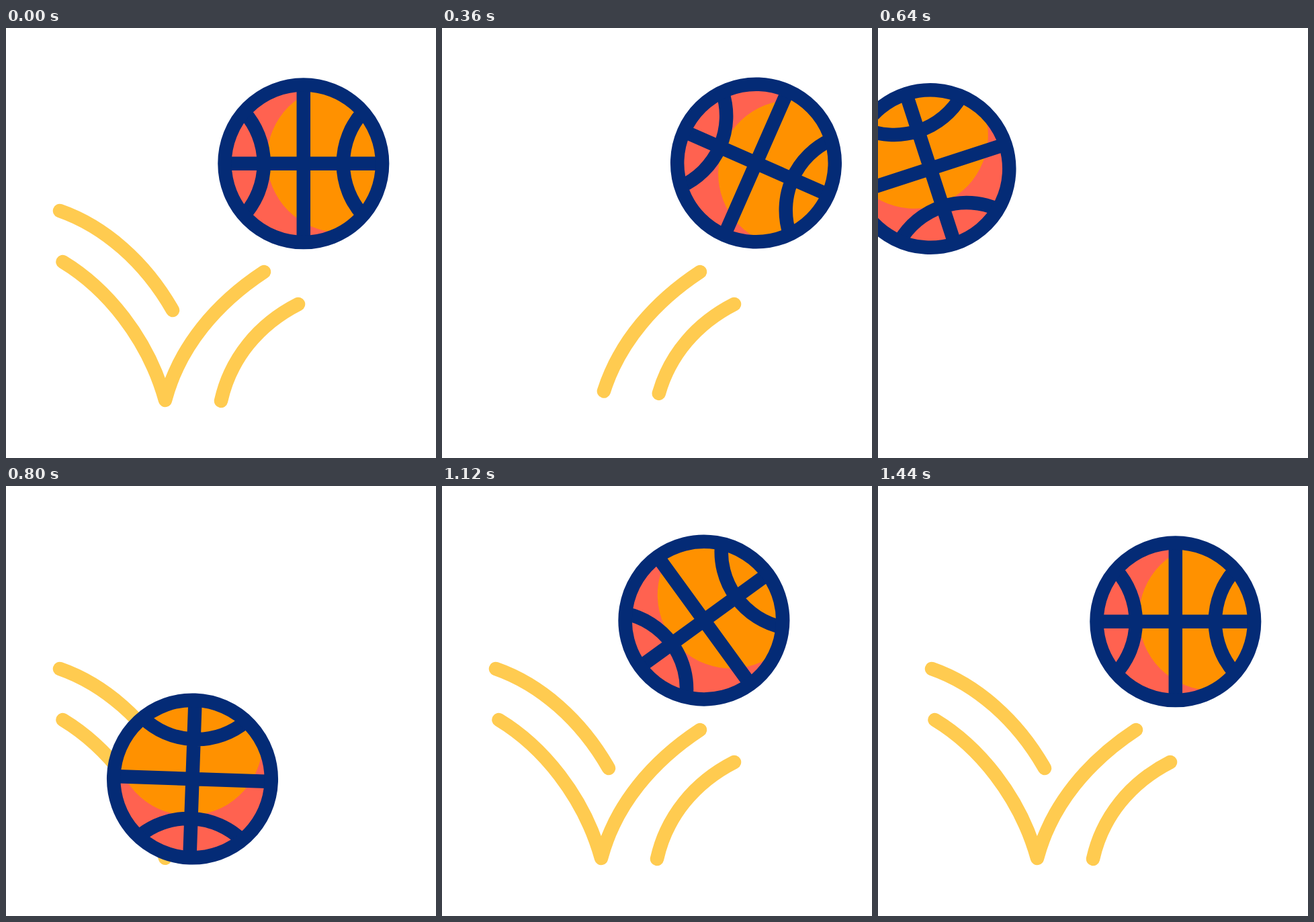
These frames come from a looping animation (640 px wide and 640 px high, 1480 ms). An HTML page:

```html
<!DOCTYPE html>
<html lang="en">
<head>
<meta charset="utf-8">
<title>Bouncing ball</title>
<style>
  html, body { margin: 0; width: 100%; height: 100%; overflow: hidden; background: #fff; }
  svg { display: block; width: 100%; height: 100%; }
  .trail path { fill: none; stroke: #ffcb50; stroke-width: 20.5; stroke-linecap: round; stroke-linejoin: round; }
  .seams { fill: none; stroke: #042b76; stroke-width: 20.5; }
</style>
</head>
<body>
<svg viewBox="0 0 640 640">
  <clipPath id="skin"><circle r="117"/></clipPath>
  <g class="trail">
    <path id="upper" pathLength="1" d="M80 272C146 295 207 348 248 420"/>
    <path id="vee" pathLength="1" d="M84.5 348C149 387 211 461 237 554C258 474 314 409 384 363"/>
    <path id="lower" pathLength="1" d="M320 555C334 492 376 441 435 411"/>
  </g>
  <g id="ball">
    <g clip-path="url(#skin)">
      <circle r="117" fill="#ff6250"/>
      <circle cx="55" cy="-7" r="109.5" fill="#ff9100"/>
    </g>
    <g class="seams">
      <path d="M0-117V117M-117 0H117M-88.6-77A115 115 0 0 1-88.6 77M88.6-77A115 115 0 0 0 88.6 77"/>
      <circle r="117.3"/>
    </g>
  </g>
</svg>
<script>
const LOOP = 1480, STEP = 40;
const REST = { x: 442.8, y: 201.8 };
const FLOOR = { x: 277.5, y: 436 };
const APEX = { x: 418, y: 194 };

const $ = id => document.getElementById(id);
const ball = $('ball');
const ramp = (t, from, to) => Math.min(1, Math.max(0, (t - from) / (to - from)));
const smooth = u => u * u * (3 - 2 * u);
const mix = (a, b, u) => a + (b - a) * u;

// Dip slightly, then shoot off to the upper right
function leave(t) {
  const dip = smooth(ramp(t, 80, 240));
  const shot = ramp(t, 240, 560) ** 2.66;
  return [REST.x + 335 * shot, REST.y + 9 * dip - 133 * shot, 60 * ramp(t, 80, 560) ** 1.72];
}

// Fall in from the left, ever steeper
function enter(t) {
  const left = (800 - t) / 160;
  return [FLOOR.x - 199.5 * left ** 1.4, FLOOR.y - 226.5 * left ** 0.8, -88 - 20 * left];
}

// Rise to the apex, then settle
function rebound(t) {
  const rise = ramp(t, 800, 1200), settle = ramp(t, 1200, 1440);
  return [
    mix(FLOOR.x, APEX.x, rise) + (REST.x - APEX.x) * (1 - (1 - settle) ** 2),
    mix(APEX.y, FLOOR.y, (1 - rise) ** 2.29) + (REST.y - APEX.y) * smooth(settle),
    -88 * (1 - ramp(t, 800, 1440)) ** 1.29
  ];
}

function trim(id, start, end) {
  const style = $(id).style;
  style.visibility = end > start ? 'visible' : 'hidden';
  style.strokeDasharray = end - start < 1 ? `${end - start} 9` : 'none';
  style.strokeDashoffset = -start;
}

function draw(time) {
  const t = Math.floor(time % LOOP / STEP) * STEP;
  const [x, y, angle] = (t < 600 ? leave : t < 800 ? enter : rebound)(t);
  ball.setAttribute('transform', `translate(${x} ${y}) rotate(${angle})`);

  if (t < 640) {
    trim('upper', ramp(t, 107, 345), 1);
    trim('vee', ramp(t, 107, 573), 1);
    trim('lower', ramp(t, 346, 580), 1);
  } else {
    const down = ramp(t, 640, 800), up = ramp(t, 800, 1000);
    trim('upper', 0, down);
    trim('vee', 0, mix(0.515 * down, 1, up));
    trim('lower', 0, up);
  }
}

const origin = performance.now();
function tick() {
  draw(performance.now() - origin);
  requestAnimationFrame(tick);
}
tick();
</script>
</body>
</html>
```
